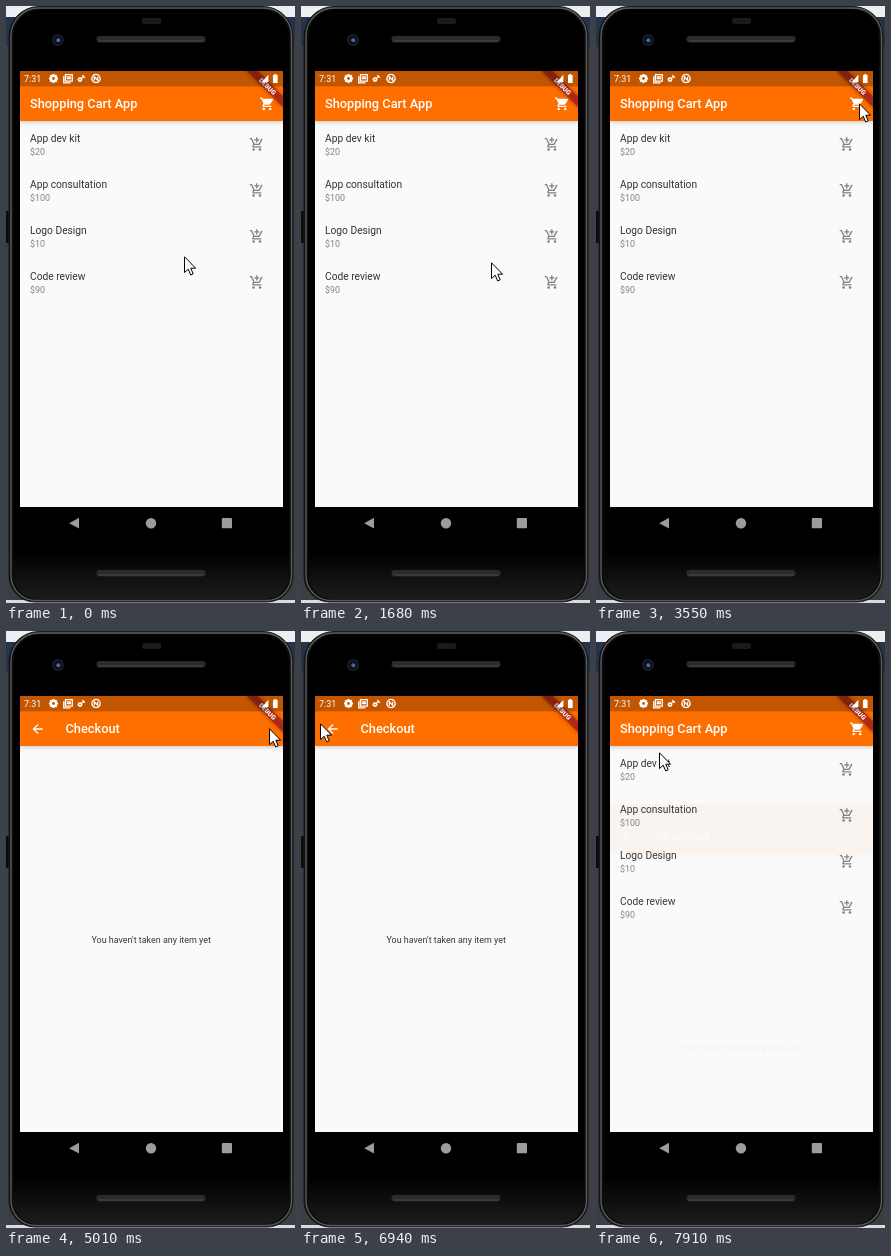
Recreate the animation shown at these times as an HTML page with a canvas. Size 289 by 597 pixels, loop 8000 ms.

```html
<!DOCTYPE html>
<html lang="en">
<head>
<meta charset="utf-8">
<title>Shopping Cart App</title>
<style>
html, body { margin: 0; width: 100%; height: 100%; overflow: hidden; background: #2b2d30; }
canvas { display: block; width: 289px; height: 597px; }
</style>
</head>
<body>
<canvas id="stage"></canvas>
<script>
const W = 289, H = 597, LOOP = 8000;
const SCR = { x: 14, y: 65, w: 263, h: 436 };
const DP = SCR.w / 411;
const ORANGE = '#ff6f00', PAPER = '#fafafa', STATUS = '#c25400';
const FONT = 'Roboto, "Open Sans", sans-serif';
const OPENED = 5010, CLOSING = 7640, CLOSED = 7910;

const canvas = document.getElementById('stage');
const ctx = canvas.getContext('2d');
const dpr = window.devicePixelRatio || 1;
canvas.width = W * dpr;
canvas.height = H * dpr;

const ITEMS = [['App dev kit', 20], ['App consultation', 100], ['Logo Design', 10], ['Code review', 90]];

// Pointer moves: first step, last step, destination.
const MOVES = [
  [150, 270, 175, 250], [680, 830, 200, 160], [1290, 1440, 258, 162],
  [1560, 1800, 182, 268], [1950, 2190, 196, 297], [2340, 2490, 182, 303],
  [2610, 2740, 244, 127], [2880, 3160, 252, 98], [3310, 3550, 263, 97],
  [5890, 5890, 224, 115], [6030, 6160, 88, 132], [6300, 6420, 24, 109],
  [6700, 6940, 19, 92], [7090, 7210, 30, 93], [CLOSING, CLOSED, 63, 121]
];

const steps = (from, to) => Math.round((to - from) / 135);

function snap(t, from, to) {
  const n = steps(from, to);
  const gap = n ? (to - from) / n : 1;
  return from + gap * Math.min(n, Math.floor((t - from) / gap + 1e-6));
}

function pointerAt(t) {
  let x = 178, y = 250;
  for (const [from, to, tx, ty] of MOVES) {
    if (t < from) break;
    const n = steps(from, to), gap = (to - from) / n || 1;
    const p = (Math.round((snap(t, from, to) - from) / gap) + 1) / (n + 1);
    const e = 1 - (1 - p) ** 2;
    x += (tx - x) * e;
    y += (ty - y) * e;
  }
  return [x, y];
}

// cubic-bezier(.4, 0, .2, 1)
function fastOutSlowIn(v) {
  let lo = 0, hi = 1, s = .5;
  for (let i = 0; i < 16; i++) {
    s = (lo + hi) / 2;
    const x = 1.2 * s * (1 - s) ** 2 + .6 * s * s * (1 - s) + s ** 3;
    if (x < v) lo = s; else hi = s;
  }
  return 3 * s * s - 2 * s ** 3;
}

// Opacity and downward shift of the checkout page.
function checkoutState(t) {
  if (t < OPENED) return null;
  if (t < CLOSING) return { alpha: 1, shift: 0 };
  const v = 1 - (snap(t, CLOSING, CLOSED) - CLOSING + 9) / 300;
  return { alpha: v ** 1.25, shift: SCR.h / 4 * (1 - fastOutSlowIn(v)) };
}

function rect(x, y, w, h, fill) {
  ctx.fillStyle = fill;
  ctx.fillRect(x, y, w, h);
}

function round(x, y, w, h, r, fill, line, width = 1) {
  ctx.beginPath();
  ctx.roundRect(x, y, w, h, r);
  if (fill) { ctx.fillStyle = fill; ctx.fill(); }
  if (line) { ctx.strokeStyle = line; ctx.lineWidth = width; ctx.stroke(); }
}

function disc(x, y, r, fill) {
  ctx.beginPath();
  ctx.arc(x, y, r, 0, 7);
  ctx.fillStyle = fill;
  ctx.fill();
}

function text(str, x, y, sp, fill, weight = 400, align = 'left') {
  ctx.font = `${weight} ${sp * DP}px ${FONT}`;
  ctx.textAlign = align;
  ctx.fillStyle = fill;
  ctx.fillText(str, x, y);
}

// Draws in a 24-unit icon grid centred on x, y.
function icon(x, y, color, draw, size = 24) {
  ctx.save();
  ctx.translate(x, y);
  ctx.scale(size * DP / 24, size * DP / 24);
  ctx.translate(-12, -12);
  ctx.strokeStyle = ctx.fillStyle = color;
  ctx.lineWidth = 2;
  draw(color);
  ctx.restore();
}

const stroke = d => ctx.stroke(new Path2D(d));
const fill = d => ctx.fill(new Path2D(d));

function cartBase(color) {
  stroke('M1 3h2.6l4.3 9h7.7M7.4 12L6.1 14.4Q5.4 16 7 16H19');
  disc(7, 20, 2, color);
  disc(17, 20, 2, color);
}

function cart(color) {
  cartBase(color);
  fill('M4.5 4H20.5Q22.3 4.2 21.6 5.7L17.5 12Q16.8 13 15.5 13H8z');
}

function addCart(color) {
  cartBase(color);
  stroke('M15 12h.6l4.6-8.4M12 1v8M8 5h8');
}

function backArrow() {
  stroke('M20 12H5.5M12.7 4.7L5.4 12l7.3 7.3');
}

function gear(color) {
  ctx.translate(12, 12);
  for (let i = 0; i < 4; i++) {
    ctx.rotate(Math.PI / 4);
    ctx.fillRect(-2.6, -11, 5.2, 22);
  }
  disc(0, 0, 8.5, color);
  disc(0, 0, 3.4, STATUS);
}

function album() {
  ctx.lineWidth = 3;
  stroke('M6 3h16v15H6zM2 7v15h16M9 8h10M9 12h10');
}

function wrench(color) {
  ctx.lineWidth = 3.5;
  disc(8, 15, 6.5, color);
  stroke('M8 15L19 5M14 3l7 7');
  disc(8, 15, 2, STATUS);
}

function badge() {
  ctx.lineWidth = 3;
  stroke('M12 2a10 10 0 1 0 .1 0zM8 17V8l8 8V8');
}

function statusBar() {
  const white = '#fff', y = 72.5;
  rect(SCR.x, SCR.y, SCR.w, 24 * DP, 'rgba(0,0,0,.24)');
  text('7:31', 18, 76, 14, white);
  icon(47.5, y, white, gear, 15.5);
  icon(62, y, white, album, 16);
  icon(75.5, y, white, wrench, 14);
  icon(90, y, white, badge, 15.5);
  icon(259, y, white, () => fill('M21 2V22H3z'), 14);
  rect(267, 69, 4.6, 8, white);
  rect(268.3, 68, 2, 1, white);
}

function debugBanner() {
  ctx.save();
  ctx.translate(SCR.x + SCR.w, SCR.y);
  ctx.rotate(Math.PI / 4);
  ctx.scale(DP, DP);
  ctx.shadowColor = 'rgba(0,0,0,.5)';
  ctx.shadowBlur = 4 * dpr;
  rect(-40, 28, 80, 12, 'rgba(175,28,28,.72)');
  ctx.shadowColor = 'transparent';
  ctx.font = `900 10.2px ${FONT}`;
  ctx.textAlign = 'center';
  ctx.fillStyle = '#fff';
  ctx.fillText('DEBUG', 0, 37.7);
  ctx.restore();
}

function page(title, titleX) {
  rect(SCR.x, SCR.y, SCR.w, SCR.h, PAPER);
  ctx.save();
  ctx.shadowColor = 'rgba(0,0,0,.22)';
  ctx.shadowBlur = 4 * dpr;
  ctx.shadowOffsetY = dpr;
  rect(SCR.x, SCR.y, SCR.w, 50, ORANGE);
  ctx.restore();
  text(title, titleX, 102.4, 20, '#fff', 500);
}

function home() {
  page('Shopping Cart App', 24);
  icon(261, 97.8, '#fff', cart);
  ITEMS.forEach(([name, price], i) => {
    const y = 136 + 46 * i;
    text(name, 24, y, 16, 'rgba(0,0,0,.8)');
    text('$' + price, 24, y + 13.2, 14, 'rgba(0,0,0,.48)');
    icon(250.8, y + 2.3, 'rgb(128,128,128)', addCart);
  });
}

function checkout() {
  page('Checkout', 59.5);
  icon(31.7, 98, '#fff', backArrow);
  text("You haven't taken any item yet", 145.2, 311.8, 14, 'rgba(0,0,0,.78)', 400, 'center');
}

function speaker(y) {
  round(90.5, y, 109, 6.5, 3, '#2b2b2b');
  rect(93, y + 4.5, 104, 1, '#4a4a4a');
}

function phone() {
  rect(0, 0, W, H, '#3b3e42');
  rect(0, 0, W, 11, '#eceef1');
  rect(0, 11, W, 29, '#26334a');
  rect(0, 594, W, 3, '#d8dadd');
  rect(0, 205, 5, 32, '#0a0a0a');
  round(3, .5, 284, 595.5, [30, 30, 26, 26], '#0c0c0c', '#1a1a1a');
  round(5, 2, 280.5, 592.5, [28, 28, 25, 25], null, '#5c5c5c', 1.4);
  const body = ctx.createLinearGradient(0, 545, 0, 593);
  body.addColorStop(0, '#000');
  body.addColorStop(1, '#1c1c1c');
  round(7.5, 3.5, 275.5, 589.5, [27, 27, 24, 24], body);
  round(136, 12, 19, 6, 2, '#1b1b1d');
  speaker(30);
  speaker(564);
  disc(52, 34, 6, '#1c1d22');
  disc(52, 34, 4, '#0b0e1c');
  disc(52.3, 34.3, 2, '#4a66a8');
}

function navBar() {
  ctx.fillStyle = '#9c9c9c';
  fill('M73 511.8V522.6L63.2 517.2z');
  disc(145, 517.2, 5.2, '#9c9c9c');
  round(215.8, 512, 10.2, 10.2, 1, '#9c9c9c');
}

function pointer(x, y) {
  ctx.save();
  ctx.translate(x, y);
  const arrow = new Path2D('M.5 .8V16.6L4.2 13.2L6.7 19L9.2 17.9L6.8 12.2H11.6z');
  ctx.fillStyle = '#fff';
  ctx.fill(arrow);
  ctx.strokeStyle = '#000';
  ctx.lineWidth = 1;
  ctx.stroke(arrow);
  ctx.restore();
}

// The checkout page is kept as one sheet so that it fades as a whole.
const sheet = document.createElement('canvas');
sheet.width = canvas.width;
sheet.height = canvas.height;
const sheetCtx = sheet.getContext('2d');

function paintSheet() {
  ctx.clearRect(0, 0, W, H);
  checkout();
  sheetCtx.clearRect(0, 0, sheet.width, sheet.height);
  sheetCtx.drawImage(canvas, 0, 0);
}

function draw(now) {
  const t = now % LOOP;
  const top = checkoutState(t);
  ctx.setTransform(dpr, 0, 0, dpr, 0, 0);
  if (top) paintSheet();
  phone();
  navBar();
  ctx.save();
  ctx.beginPath();
  ctx.rect(SCR.x, SCR.y, SCR.w, SCR.h);
  ctx.clip();
  home();
  if (top) {
    ctx.globalAlpha = top.alpha;
    ctx.drawImage(sheet, 0, Math.round(top.shift), W, H);
    ctx.globalAlpha = 1;
  }
  debugBanner();
  statusBar();
  ctx.restore();
  pointer(...pointerAt(t).map(Math.round));
}

const start = performance.now();
function tick() {
  draw(performance.now() - start);
  requestAnimationFrame(tick);
}
tick();
</script>
</body>
</html>
```
